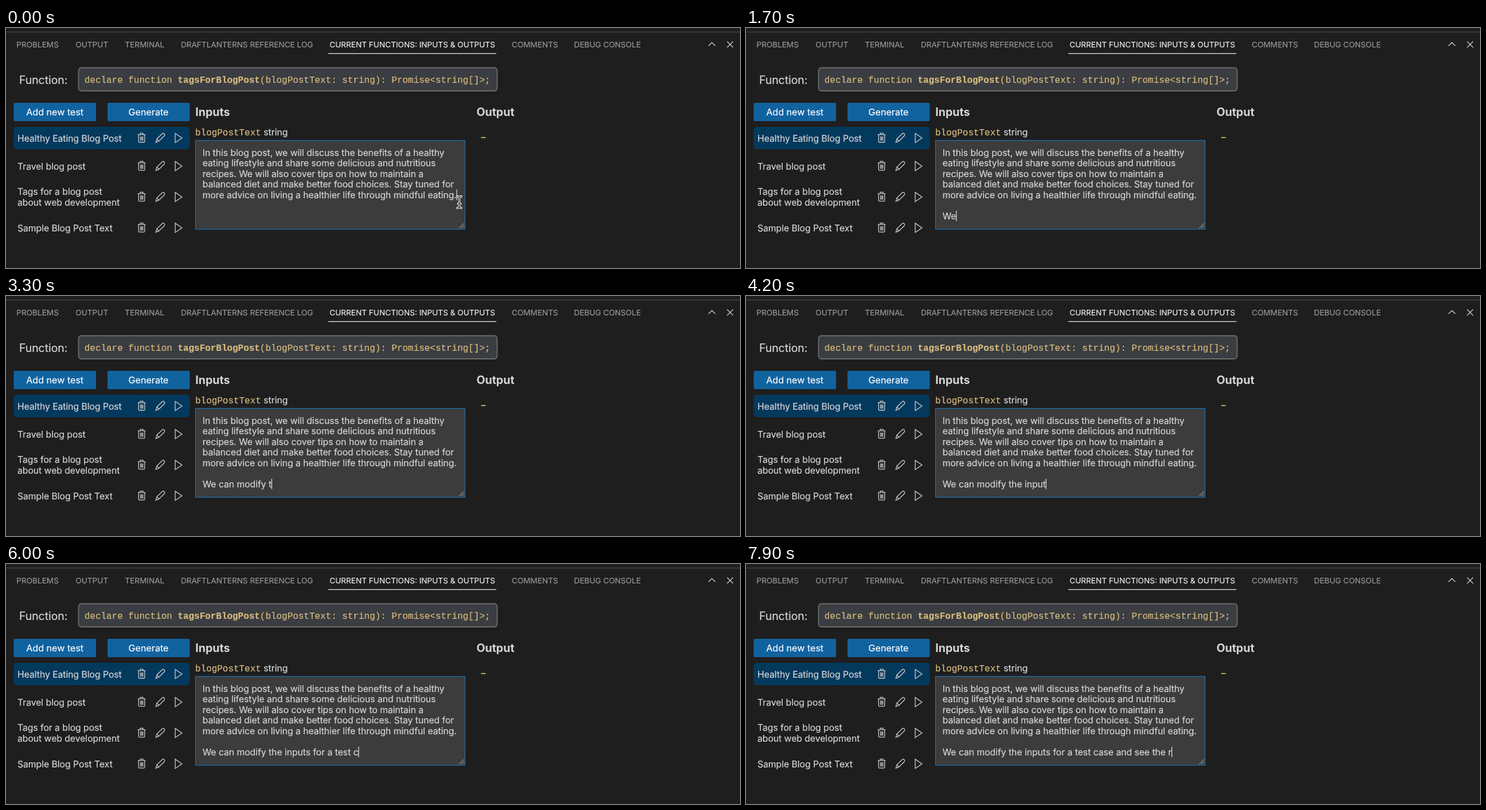
Write an HTML page that moves like this. It is 1280 px wide and 420 px high and loops after 8000 ms.

```html
<!DOCTYPE html>
<html lang="en">
<head>
<meta charset="utf-8">
<title>Test inputs panel</title>
<style>
  html, body { margin: 0; width: 100%; height: 100%; overflow: hidden; background: #1e1e1e; }
  svg { display: block; width: 1280px; height: 420px; }
  text {
    font: 15.68px Inter, sans-serif; color: #d6d6d6; white-space: pre;
    fill: currentColor; stroke: currentColor; stroke-width: .2;
  }
  .tab { font-size: 13.6px; color: #959595; }
  .active { color: #e7e7e7; }
  .label { font-size: 19.4px; }
  .head { font-size: 19.6px; font-weight: 700; stroke: none; }
  .button { font-size: 16.1px; color: #fff; text-anchor: middle; }
  .code { font: 15.95px "Liberation Mono", monospace; color: #d7ba7d; }
  .bold { font-weight: 700; }
  .line { fill: none; stroke: #cccccc; stroke-width: 1.3; }
</style>
</head>
<body>
<svg id="stage" viewBox="0 0 1280 420" xmlns="http://www.w3.org/2000/svg">
  <defs>
    <g id="tools" class="line">
      <path d="M229.5 -5.5H243 M233.8 -5.5V-8H238.7V-5.5 M231 -5.5V6.2Q231 7.8 232.6 7.8H240Q241.5 7.8 241.5 6.2V-5.5 M234.3 -2.5V5 M236.3 -2.5V5 M238.3 -2.5V5"/>
      <path d="M261 8L262.8 2L272.3 -7.4Q274 -8.6 275.7 -7Q277.2 -5.3 276 -3.7L266.5 5.8Z M262.8 2L266.5 5.8"/>
      <path d="M294.8 -7.8V8.4L306.6 .3Z"/>
    </g>
    <path id="beam" d="M786.8 294.5Q790.5 294.5 790.5 298V311.5Q790.5 315 786.8 315 M794.2 294.5Q790.5 294.5 790.5 298 M790.5 311.5Q790.5 315 794.2 315 M788.2 307.5H792.8"/>
  </defs>
  <rect width="1280" height="420" fill="#1e1e1e"/>
  <rect y="6.3" width="1280" height="1.3" fill="#454545"/>
  <g id="tabs"></g>
  <rect x="562" y="44" width="293" height="1.3" fill="#e7e7e7"/>
  <path class="line" d="M1225 31.3L1231 25.5L1237 31.3 M1257.5 23.5L1268 34 M1268 23.5L1257.5 34"/>

  <text class="label" x="22.9" y="97.7">Function:</text>
  <rect x="126.5" y="69.5" width="730" height="40.5" rx="5" fill="#3a3d41" stroke="#6b6b6b" stroke-width="1.8"/>
  <text class="code" x="136.8" y="96">declare function <tspan class="bold">tagsForBlogPost</tspan>(blogPostText: string): Promise&lt;string[]&gt;;</text>

  <rect x="13.4" y="131" width="143.6" height="32" rx="2" fill="#1163a0"/>
  <rect x="177" y="131" width="143.4" height="32" rx="2" fill="#1163a0"/>
  <text class="button" x="85.2" y="153">Add new test</text>
  <text class="button" x="248.5" y="153">Generate</text>
  <rect x="13.4" y="173" width="307" height="39" rx="5" fill="#04395e"/>
  <g id="tests"></g>

  <text class="head" x="330.2" y="154.2">Inputs</text>
  <text class="head" x="820.4" y="154.2">Output</text>
  <text class="code" x="330" y="188">blogPostText</text>
  <text x="449.3" y="188">string</text>
  <rect x="828.5" y="190.8" width="8" height="1.7" fill="#d7ba7d"/>
  <rect x="330.5" y="196.7" width="470" height="155.5" fill="#3c3c3c" stroke="#1479c4" stroke-width="1.1"/>
  <path class="line" style="stroke-width:1" d="M790.5 350L798.5 342 M795 350L798.5 346.5"/>
  <g id="lines"></g>
  <text id="typed" x="342.7" y="334.7"></text>
  <rect id="caret" width="1.2" height="18.4" fill="#e6e6e6"/>
  <g id="pointer" fill="none" stroke-linecap="round">
    <use href="#beam" stroke="#fff" stroke-width="3.3"/>
    <use href="#beam" stroke="#111" stroke-width="1.2"/>
  </g>
</svg>
<script>
const LOOP = 8000, STEP = 100, LEFT = 342.7, LINE = 18.45;
const SVG = "http://www.w3.org/2000/svg";
const byId = id => document.getElementById(id);

function add(parent, tag, attrs, content = "") {
  const el = document.createElementNS(SVG, tag);
  for (const key in attrs) el.setAttribute(key, attrs[key]);
  el.textContent = content;
  byId(parent).append(el);
  return el;
}

[
  [18.3, "PROBLEMS"],
  [121.3, "OUTPUT"],
  [207.3, "TERMINAL"],
  [304.9, "DRAFTLANTERNS REFERENCE LOG"],
  [564.3, "CURRENT FUNCTIONS: INPUTS & OUTPUTS", "tab active"],
  [882, "COMMENTS"],
  [990.6, "DEBUG CONSOLE"]
].forEach(([x, name, cls = "tab"]) => add("tabs", "text", { x, y: 34, class: cls }, name));

[
  [192.5, "Healthy Eating Blog Post"],
  [241.7, "Travel blog post"],
  [295.7, "Tags for a blog post", "about web development"],
  [349.7, "Sample Blog Post Text"]
].forEach(([y, ...rows]) => {
  const top = y + 6 - (rows.length - 1) * LINE / 2;
  rows.forEach((row, i) => add("tests", "text", { x: 20, y: top + i * LINE }, row));
  add("tests", "use", { href: "#tools", x: 0.3, y: y - 0.3 });
});

const paragraph = [
  "In this blog post, we will discuss the benefits of a healthy",
  "eating lifestyle and share some delicious and nutritious",
  "recipes. We will also cover tips on how to maintain a",
  "balanced diet and make better food choices. Stay tuned for",
  "more advice on living a healthier life through mindful eating."
].map((row, i) => add("lines", "text", { x: LEFT, y: 224 + i * LINE }, row));

const message = "We can modify the inputs for a test case and see the r";
// Typing bursts: start time, number of steps, characters added
const bursts = [
  [1600, 10, 10], [2700, 2, 2], [3000, 2, 2], [3300, 3, 3], [3700, 2, 3],
  [4000, 4, 4], [4500, 1, 1], [4700, 6, 7], [5400, 4, 4], [6000, 1, 1],
  [6200, 4, 4], [6700, 6, 6], [7400, 4, 6], [7900, 1, 1]
];

function typedCount(t) {
  return bursts.reduce((sum, [start, steps, chars]) => {
    const done = Math.max(0, Math.min(steps, Math.floor((t - start) / STEP) + 1));
    return sum + Math.round(chars * done / steps);
  }, 0);
}

function draw(t) {
  const typed = byId("typed"), caret = byId("caret");
  const row = t < 400 ? 4 : t < 600 ? 5 : 6;
  typed.textContent = message.slice(0, typedCount(t));
  const before = row === 4 ? paragraph[4] : typed;
  const width = before.textContent ? before.getComputedTextLength() : 0;
  caret.setAttribute("x", LEFT - 0.3 + width);
  caret.setAttribute("y", 209 + row * LINE);
  byId("pointer").setAttribute("visibility", t < 400 ? "visible" : "hidden");
}

const origin = performance.now();
function tick() {
  draw((performance.now() - origin) % LOOP);
  requestAnimationFrame(tick);
}
draw(0);
requestAnimationFrame(tick);
</script>
</body>
</html>
```
